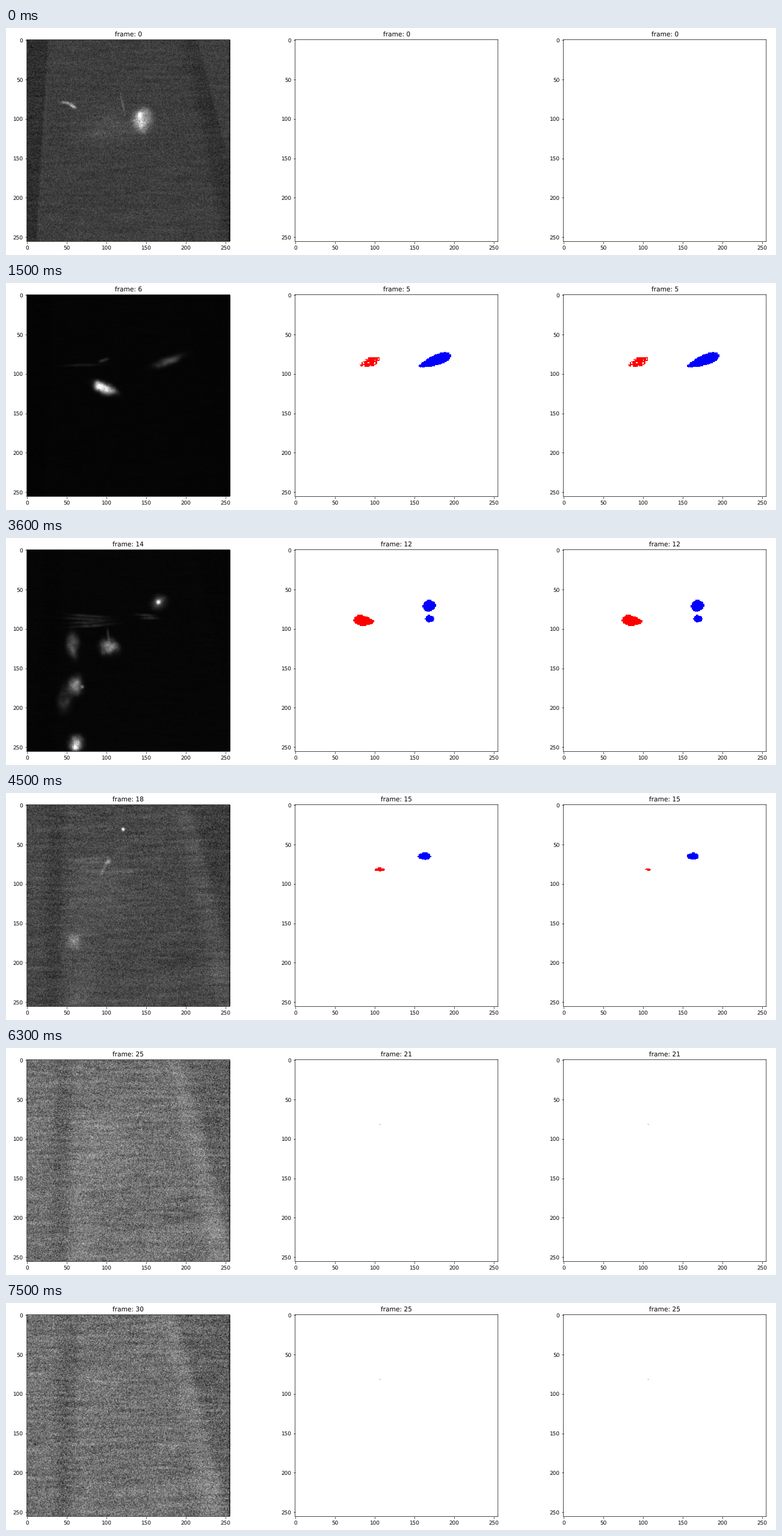
These frames come from a looping animation (1280 by 379 pixels, 7800 ms). A matplotlib script:

```python
import numpy as np
import matplotlib.pyplot as plt
from matplotlib.animation import FuncAnimation

W, H, DPI = 1280, 379, 64
FRAMES, INTERVAL = 26, 300
N = 256
Y, X = np.mgrid[0:N, 0:N].astype(float)
RED, BLUE = (255, 0, 0), (0, 0, 255)


def smooth_noise(seed, sx, sy):
    """Unit-variance noise blurred by sx, sy pixels."""
    fy, fx = np.fft.fftfreq(N)[:, None], np.fft.fftfreq(N)[None, :]
    kernel = np.exp(-2 * np.pi**2 * ((fx * sx)**2 + (fy * sy)**2))
    field = np.random.default_rng(seed).standard_normal((N, N))
    field = np.fft.ifft2(np.fft.fft2(field) * kernel).real
    return field / field.std()


STREAKS = smooth_noise(4, 11, 1)
LUMPS = smooth_noise(5, 2, 2)
WARP_X, WARP_Y = smooth_noise(6, 5, 5), smooth_noise(7, 5, 5)


def local_axes(x, y, angle):
    """Pixel coordinates relative to x, y, turned by angle in degrees."""
    c, s = np.cos(np.radians(angle)), np.sin(np.radians(angle))
    return (X - x) * c + (Y - y) * s, (Y - y) * c - (X - x) * s


def spot(x, y, rx, ry, angle=0):
    u, v = local_axes(x, y, angle)
    return np.exp(-((u / rx)**2 + (v / ry)**2)**1.3)


def cell(x, y, rx, ry, angle, peak):
    """A lumpy bright body with an uneven outline."""
    bend = min(rx, ry) / 8
    body = spot(x + bend * WARP_X, y + bend * WARP_Y, rx, ry, angle)
    return peak * body * (1 + 0.15 * LUMPS)


def fibres(seed, count, x, y, length, peak):
    """Thin, nearly level strands stacked downwards from y."""
    rng = np.random.default_rng(seed)
    return sum(cell(x + rng.uniform(-6, 6), y + 4 * k, length * rng.uniform(0.7, 1.1),
                    1.8, rng.uniform(-6, 6), peak) for k in range(count))


def surface_layer():
    body = cell(145, 103, 10, 13, 10, 120) + cell(142, 96, 4, 4, 0, 75)
    arc = cell(49, 80, 7, 1.8, 6, 75) + cell(57, 84, 5, 2, 32, 125)
    return body + arc + cell(120, 82, 1.2, 14, -10, 35) + cell(105, 114, 34, 22, 0, 16)


def upper_layer():
    body = cell(98, 119, 13, 6, 25, 220) + cell(88, 115, 4, 6, 0, 90)
    wing = cell(177, 84, 18, 5, -20, 65)
    return body + wing + cell(96, 83, 6, 2, -15, 45) + cell(70, 89, 22, 1.8, -2, 20)


def lower_layer():
    head = cell(165, 67, 2.6, 2.6, 0, 170) + cell(166, 67, 9, 7, -25, 75)
    body = cell(104, 124, 10, 9, 30, 125) + cell(102, 110, 1.6, 9, -8, 40)
    column = sum(cell(58 + 2 * k, y, 7 + k, 14 - 3 * k, 8 * k, 80 + 35 * k)
                 for k, y in enumerate((121, 172, 246)))
    bright = cell(63, 251, 5, 4, 0, 110) + cell(69, 174, 2, 2, 0, 90)
    strands = fibres(2, 4, 80, 84, 28, 32) + fibres(3, 2, 154, 83, 14, 34)
    return head + body + column + bright + strands + cell(47, 190, 8, 14, 0, 36)


def deep_layer():
    twig = cell(101, 73, 4, 2.5, -30, 75) + cell(95, 83, 1.5, 9, 28, 36)
    dots = cell(121, 31, 2, 2, 0, 180) + cell(58, 173, 8, 9, 0, 42)
    return twig + dots + fibres(1, 2, 74, 69, 23, 20) + cell(124, 85, 14, 2, 3, 22)


# Depth, reach in depth, picture
LAYERS = [(0, 2.6, surface_layer()), (6, 4, upper_layer()),
          (14, 3, lower_layer()), (18, 1.5, deep_layer())]
DEEP_SHADE = (0.2 * spot(92, 112, 46, 48) + 0.17 * spot(66, 215, 22, 72)
              + 0.15 * spot(237, 212, 12, 9) - 0.15 * spot(192, 195, 32, 12))


def step(d, softness):
    return 0.5 + 0.5 * np.tanh(d / softness)


def tissue(z):
    """Relative brightness of the background: dark left band, slanted right band."""
    deep = min(z / 18, 1)
    soft = 1 + 5 * deep
    edge = 26 + 1.2 * z - (15 - 9 * deep) * Y / N
    slant = 214 - 0.03 * z**2 + 0.26 * Y
    left = step(edge - X, soft) * step(X - edge + 30 - 9 * deep, soft)
    band = step(slant - X, soft) * step(X - slant + 18 + 0.05 * Y, 6)
    gain = 1 - (0.26 - 0.1 * deep) * left + (0.34 * deep - 0.2) * band
    gain -= 0.15 * deep * step(X - slant, soft)
    fade = step(z - 16.5, 1) * np.exp(-((z - 20) / 9)**2)
    return gain + fade * DEEP_SHADE + (0.04 + 0.02 * deep) * STREAKS


def scan(z):
    level = 5 + 57 * np.exp(-(z / 2.5)**2) + 107 * step(z - 17.6, 1.6)
    noise = np.random.default_rng(100 + z).standard_normal((N, N))
    image = level * (tissue(z) + (0.17 + 0.002 * z) * noise)
    for depth, reach, glow in LAYERS:
        image += glow * np.exp(-((z - depth) / reach)**4) * (1 + 0.08 * noise)
    return np.clip(image, 0, 255)


# Region poses at three times: x, y, radius x, radius y, angle, taper, roughness
TIMES = (5, 12, 15)
LEFT_POSES = [(93, 85.5, 14, 6, -18, 0.2, 0.4),
              (86, 90, 13.5, 6.5, 8, -0.35, 0.08),
              (106, 82, 7, 2.2, 0, 0, 0.1)]
RIGHT_POSES = [(175, 83.5, 22, 6.7, -20, 0.35, 0.06),
               (168, 71, 8.5, 7.5, -10, 0, 0.06),
               (161.7, 65.2, 8.5, 4.8, 0, 0.2, 0.06)]
SMALL_POSE = (168.5, 87.5, 5.8, 4.8, 0, 0, 0.06)


def region(pose, scale, texture):
    """Tapered ellipse whose edge is eaten away by the texture."""
    x, y, rx, ry, angle, taper, rough = pose
    u, v = local_axes(x, y, angle)
    u = u / (rx * scale + 1e-6)
    v = v / (ry * scale + 1e-6) / np.clip(1 + taper * u, 0.3, 2)
    return u**2 + v**2 + rough * np.abs(texture) < 1


def regions(i, refined):
    picture = np.full((N, N, 3), 255, np.uint8)
    texture = smooth_noise(40 + i, 1, 0.8)
    size = np.interp(i, [1, 4, 15, 16], [0, 1, 1, 0])
    trim = np.clip((i - 12) / 3, 0, 1) * refined

    def pose(poses):
        return [np.interp(i, TIMES, values) for values in zip(*poses)]

    small = np.interp(i, [8, 12, 15], [0, 1, 0])
    picture[region(pose(LEFT_POSES), size * (1 - 0.4 * trim), texture)] = RED
    picture[region(pose(RIGHT_POSES), size * (1 - 0.08 * trim), texture)] = BLUE
    picture[region(SMALL_POSE, small, texture)] = BLUE
    return picture


plt.rcParams.update({"font.family": "DejaVu Sans", "text.hinting": "none"})
fig = plt.figure(figsize=(W / DPI, H / DPI), dpi=DPI, facecolor="white")


def panel(left, **style):
    ax = fig.add_axes([left / W, 22.5 / H, 337.2 / W, 337 / H])
    image = ax.imshow(np.full((N, N, 3), 255, np.uint8), aspect="auto", **style)
    ax.set_xticks(range(0, N, 50))
    ax.set_yticks(range(0, N, 50))
    for line in [*ax.spines.values(), *ax.get_xticklines(), *ax.get_yticklines()]:
        line.set_snap(False)
    return image, ax.set_title("frame: 0")


panels = [panel(34.6, cmap="gray", vmin=0, vmax=255),
          panel(480.6, interpolation="nearest"),
          panel(926.6, interpolation="nearest")]


def update(i):
    z = i * 6 // 5
    pictures = scan(z), regions(i, False), regions(i, True)
    for (image, title), picture, label in zip(panels, pictures, (z, i, i)):
        image.set_data(picture)
        title.set_text(f"frame: {label}")
    return [artist for pair in panels for artist in pair]


anim = FuncAnimation(fig, update, frames=FRAMES, interval=INTERVAL,
                     init_func=lambda: update(0), repeat=True, repeat_delay=0)
plt.show()
```
